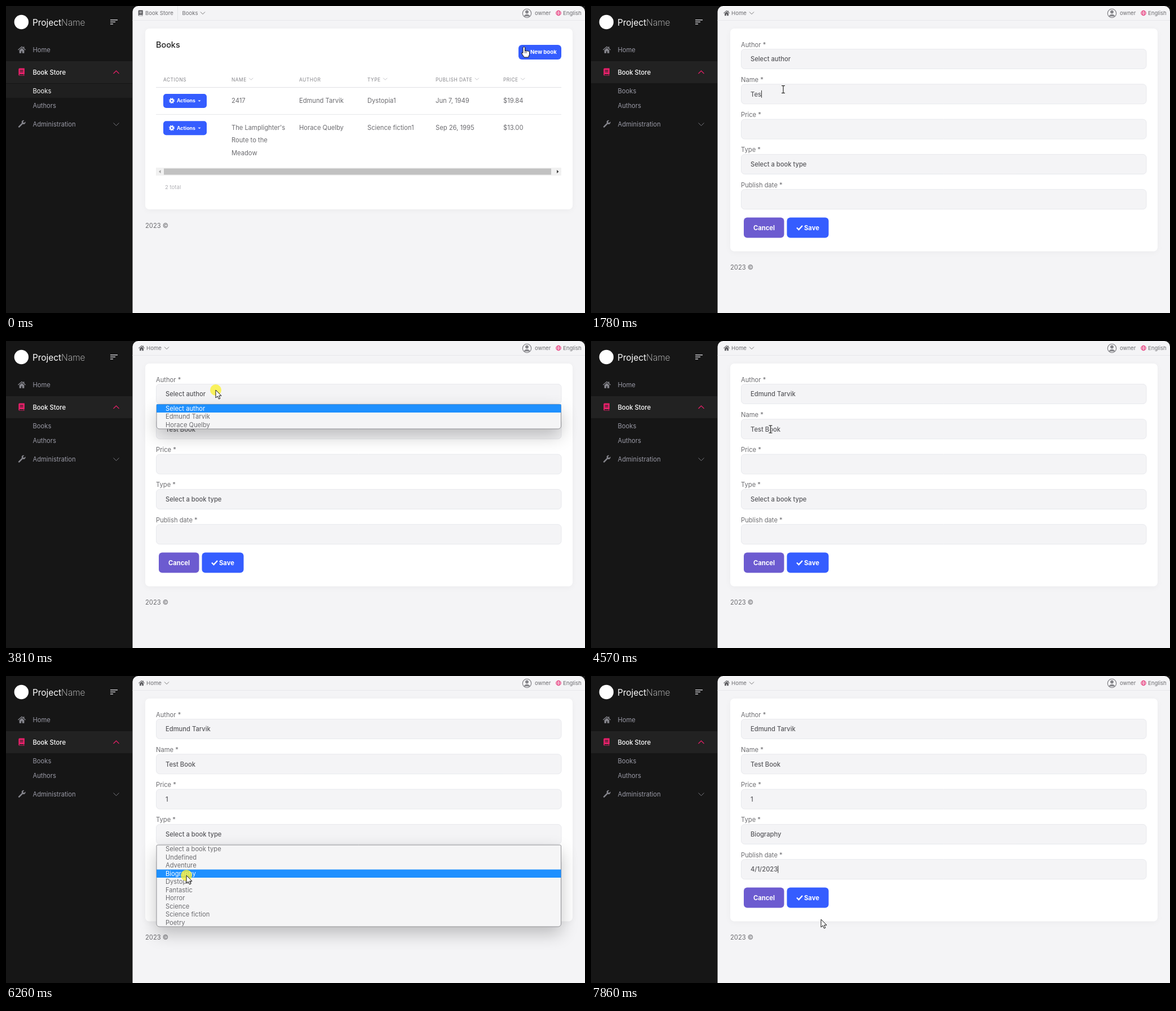
An HTML page with a canvas for the animation above (7990 ms loop, 1027x545 px).

```html
<!DOCTYPE html>
<html lang="en">
<head>
<meta charset="utf-8">
<title>New book form</title>
<style>
html, body { margin: 0; width: 100%; height: 100%; overflow: hidden; background: #161616; }
canvas { display: block; }
</style>
</head>
<body>
<canvas id="stage" width="1027" height="545"></canvas>
<script>
const ctx = document.getElementById('stage').getContext('2d');
const LOOP = 7990;
const BLUE = '#355dff', PINK = '#e8206a', FIELD = '#f4f4f6', GRAY = '#6c6c70';
const AUTHORS = ['Select author', 'Edmund Tarvik', 'Horace Quelby'];
const TYPES = ['Select a book type', 'Undefined', 'Adventure', 'Biography', 'Dystopia',
  'Fantastic', 'Horror', 'Science', 'Science fiction', 'Poetry'];
const ROW = 14.5, CELL = 25.6;

// Moments at which the state changes, in ms
const FORM = 330, AUTHOR_OPEN = 3770, AUTHOR_PICK = 4490, PRICE_FOCUS = 4890,
  TYPE_OPEN = 5450, TYPE_PICK = 6390, DATE_FOCUS = 6890, DATE_PICK = 7820;
const NAME_KEYS = [1320, 1570, 1780, 2030, 2280, 2530, 2730, 2900, 3080];
const CLICKS = [[80, 280], [3730, 3890], [4410, 4530], [4850, 4970],
  [5450, 5610], [6230, 6390], [6810, 6930]];
const POINTER = [[0, 919, 73], [400, 919, 73], [750, 543, 165], [830, 377, 170], [990, 62, 178],
  [1150, 341, 148], [1780, 341, 148], [2030, 343, 148], [2280, 343, 148], [2320, 353, 158],
  [3410, 353, 158], [3730, 372, 87], [3890, 372, 87], [4220, 326, 130], [4490, 326, 130],
  [4770, 300, 222], [5130, 300, 222], [5410, 322, 279], [5560, 322, 279], [6230, 320, 354],
  [6390, 320, 354], [6650, 322, 345], [6930, 322, 345], [7570, 408, 432], [LOOP, 408, 432]];

const HOME = new Path2D('M8 1 0 8l1 1 7-6 7 6 1-1-3-2.6V2h-2v1.6zM8 4.5 3 9v6h4v-4h2v4h4V9z');
const BOOK = new Path2D('M3 0h11v13h-1v2h1v1H3a2 2 0 0 1-2-2V2a2 2 0 0 1 2-2zM4 4v1.5h7V4zM4 7v1.5h7V7zM3 13v2h9v-2z');
const WRENCH = new Path2D('M1 13 8 6a4 4 0 0 1 5-5.5L10.5 3l.5 2 2 .5L15.5 3A4 4 0 0 1 10 8l-7 7a1.5 1.5 0 0 1-2-2z');
const ARROW = new Path2D('M0 0V14L3.2 11 5.5 16 7.8 15 5.6 10.2H10z');
const HAND = new Path2D('M-2 .5Q0-1.5 1.5.5V7q1.5-1 3 0 1.5-.8 2.8.3 2-.5 2.2 1.2V13L7.5 18H0L-4.5 11Q-5 9-2 10.5z');

function text(str, x, middle, size = 11.2, weight = 400, color = GRAY, spacing = 0, align = 'left') {
  ctx.font = `${weight} ${size}px Inter, sans-serif`;
  ctx.letterSpacing = spacing + 'px';
  ctx.textAlign = align;
  ctx.fillStyle = color;
  ctx.fillText(str, x, middle + size * 0.36);
  return ctx.measureText(str).width;
}

function rect(x, y, w, h, color) {
  ctx.fillStyle = color;
  ctx.fillRect(x, y, w, h);
}

function box(x, y, w, h, radius, fill, border) {
  ctx.beginPath();
  ctx.roundRect(x, y, w, h, radius);
  ctx.fillStyle = fill;
  ctx.fill();
  if (border) stroke(border, 1);
}

function stroke(color, width, path) {
  ctx.strokeStyle = color;
  ctx.lineWidth = width;
  path ? ctx.stroke(path) : ctx.stroke();
}

function line(points, color, width) {
  ctx.beginPath();
  points.forEach(([x, y]) => ctx.lineTo(x, y));
  stroke(color, width);
}

function disc(x, y, r, color) {
  ctx.beginPath();
  ctx.arc(x, y, r, 0, 7);
  ctx.fillStyle = color;
  ctx.fill();
}

function ring(x, y, rx, ry, color, width) {
  ctx.beginPath();
  ctx.ellipse(x, y, rx, ry, 0, 0, 2 * Math.PI);
  stroke(color, width);
}

function icon(path, x, y, size, color) {
  ctx.save();
  ctx.translate(x - size / 2, y - size / 2);
  ctx.scale(size / 16, size / 16);
  ctx.fillStyle = color;
  ctx.fill(path, 'evenodd');
  ctx.restore();
}

// Positive size points down, negative points up
function chevron(x, y, size, color, width = 1) {
  const w = Math.abs(size);
  line([[x - w, y - size / 2], [x, y + size / 2], [x + w, y - size / 2]], color, width);
}

function withShadow(color, blur, offset, draw) {
  ctx.save();
  Object.assign(ctx, { shadowColor: color, shadowBlur: blur, shadowOffsetY: offset });
  draw();
  ctx.restore();
}

function sidebar(onForm) {
  rect(0, 0, 1027, 545, '#161616');
  disc(27.3, 28.5, 12.7, '#fff');
  const w = text('Project', 47, 29, 15.4, 400, '#fff');
  text('Name', 47 + w, 29, 15.4, 200, '#ddd');
  [13, 9, 5].forEach((len, i) => rect(185, 24 + i * 3.6, len, 1.5, '#c4c4c8'));

  rect(0, 98, 224, 39, '#222');
  if (!onForm) rect(0, 138, 224, 25, '#1f1f1f');
  icon(HOME, 28, 77.5, 14, '#85858c');
  text('Home', 47.5, 78, 11.2, 400, '#9a9aa6');
  icon(BOOK, 28, 117, 13, PINK);
  text('Book Store', 47.5, 117.5, 11.2, 500, '#fff');
  chevron(195.5, 117.5, -5, PINK, 1.2);
  text('Books', 47.5, 150.5, 11.2, 400, onForm ? '#9a9aa6' : '#fff');
  text('Authors', 47.5, 177, 11.2, 400, '#9a9aa6');
  icon(WRENCH, 28, 209.5, 14, '#85858c');
  text('Administration', 47.5, 210, 11.2, 400, '#9a9aa6');
  chevron(195.5, 210, 5, '#77777e');
}

function topbar(onForm) {
  box(224.5, 0, 802.5, 560, [10, 10, 0, 0], FIELD);
  rect(224.5, 25, 802.5, 1, '#e7e8eb');
  if (onForm) {
    icon(HOME, 240.5, 12.5, 11, '#5c5c60');
    text('Home', 249, 13, 9.6);
    chevron(285, 12.5, 4, '#777');
  } else {
    icon(BOOK, 239, 12.5, 10, '#5c5c60');
    text('Book Store', 247, 13, 9.6);
    rect(304, 0, 1, 25, '#e4e5e8');
    text('Books', 312.5, 13, 9.6);
    chevron(349, 12.5, 4, '#777');
  }
  ring(924, 13, 7.7, 7.7, '#77777c', 1.1);
  disc(924, 10.5, 2.9, '#85858a');
  ctx.beginPath();
  ctx.ellipse(924, 18.6, 5.4, 3.8, 0, Math.PI, 0);
  ctx.fillStyle = '#85858a';
  ctx.fill();
  text('owner', 938, 13, 9.6);
  ring(980, 12.5, 4.3, 4.3, PINK, 0.9);
  ring(980, 12.5, 1.9, 4.3, PINK, 0.8);
  [11, 14].forEach(y => line([[976, y], [984, y]], PINK, 0.8));
  text('English', 988, 13, 9.6);
}

function card(height) {
  withShadow('rgba(0,0,0,.04)', 12, 2, () => box(247, 40, 758, height, 7, '#fff'));
  text('2023 ©', 247, 68.5 + height - 40 + 0.5 + 0 + (height > 350 ? 0 : 0) + 40 - 0.5);
}

function gear(x, y) {
  ring(x, y, 2.6, 2.6, '#fff', 2.2);
  ctx.setLineDash([1.7, 1.7]);
  ring(x, y, 4.3, 4.3, '#fff', 1.4);
  ctx.setLineDash([]);
}

function listPage() {
  card(321);
  text('Books', 266, 68.5, 14.4, 500, '#222');
  box(909, 69, 76, 26, 6, BLUE);
  text('New book', 930, 82, 9.6, 700, '#fff');

  const columns = [279, 400, 520, 641, 762, 882];
  ['ACTIONS', 'NAME', 'AUTHOR', 'TYPE', 'PUBLISH DATE', 'PRICE'].forEach((label, i) => {
    const w = text(label, columns[i], 130.5, 8.4, 400, '#85858a', 0.5);
    if (i % 2 || i === 4) chevron(columns[i] + w + 8, 129.5, 3.5, '#c4c4c8');
  });
  rect(266, 144, 719, 1, '#e0e1e4');
  rect(266, 192, 719, 1, '#e6e7ea');

  const rows = [
    [['2417'], AUTHORS[1], 'Dystopia1', 'Jun 7, 1949', '$19.84'],
    [["The Lamplighter's", 'Route to the', 'Meadow'], AUTHORS[2], 'Science fiction1', 'Sep 26, 1995', '$13.00']
  ];
  rows.forEach(([title, ...cells], r) => {
    const y = 167.5 + r * 48.3;
    box(279, y - 11.5, 77, 25, 5, BLUE);
    gear(294, y + 0.7);
    text('Actions', 303, y + 0.7, 8.8, 700, '#fff');
    triangle(343, y + 0.7, 2.5, 1.6, '#fff');
    title.forEach((part, i) => text(part, columns[1], y + i * 22.4));
    cells.forEach((cell, i) => text(cell, columns[i + 2], y));
  });

  rect(266, 287, 719, 14, '#f1f1f1');
  rect(280, 288.5, 687, 11, '#c1c1c1');
  sideTriangle(271, 294, 3.5, '#a3a3a3');
  sideTriangle(980.5, 294, -3.5, '#404040');
  text('2 total', 282, 321.5, 9.6, 400, '#b0b0b5');
}

function triangle(x, y, w, h, color) {
  ctx.beginPath();
  ctx.moveTo(x - w, y - h / 2);
  ctx.lineTo(x + w, y - h / 2);
  ctx.lineTo(x, y + h);
  ctx.fillStyle = color;
  ctx.fill();
}

function sideTriangle(x, y, w, color) {
  ctx.beginPath();
  ctx.moveTo(x, y);
  ctx.lineTo(x + w, y - 3);
  ctx.lineTo(x + w, y + 3);
  ctx.fillStyle = color;
  ctx.fill();
}

function formPage(t, y) {
  card(395.5);
  const typed = NAME_KEYS.filter(key => key <= t).length;
  const fields = [
    ['Author *', AUTHORS[t < AUTHOR_PICK ? 0 : 1]],
    ['Name *', 'Test Book'.slice(0, typed), t < 3690],
    ['Price *', t < 5170 ? '' : '1', t >= PRICE_FOCUS && t < TYPE_OPEN],
    ['Type *', TYPES[t < TYPE_PICK ? 0 : 3]],
    ['Publish date *', t < DATE_PICK ? '' : '4/1/2023', t >= DATE_FOCUS]
  ];
  fields.forEach(([label, value, focused], i) => {
    const top = 76.5 + i * 62.3;
    text(label, 266, top - 8);
    box(266.5, top, 718.5, 35, 6, FIELD, '#e8e9ed');
    const w = text(value, 283, top + 17.7, 11.2, 500, '#58585c');
    if (focused) rect(283 + w, top + 11, 1, 13, '#333');
  });

  box(271, 375.5, 71.5, 36, 6, '#6c5bd0');
  text('Cancel', 288, 394, 11.2, 700, '#fff');
  box(347.5, 375.5, 74, 36, 6, BLUE);
  line([[365, 393.5], [368.5, 397], [375, 390]], '#fff', 2.3);
  text('Save', 378, 394, 11.2, 700, '#fff');

  if (t >= AUTHOR_OPEN && t < AUTHOR_PICK) dropdown(AUTHORS, 112.5, y);
  if (t >= TYPE_OPEN && t < TYPE_PICK) dropdown(TYPES, 300, y);
  if (t >= DATE_FOCUS + 40 && t < DATE_PICK) calendar(t);
}

function dropdown(options, top, pointerY) {
  const height = options.length * ROW;
  const active = Math.max(0, Math.floor((pointerY - top) / ROW));
  withShadow('rgba(0,0,0,.24)', 30, 12, () => box(267, top, 717.5, height, [2, 2, 5, 5], FIELD));
  box(267, top, 717.5, height, [2, 2, 5, 5], '#f5f5f6', '#909094');
  rect(267, top + active * ROW, 717.5, ROW, '#1e90ff');
  options.forEach((option, i) =>
    text(option, 283, top + (i + 0.5) * ROW + 0.2, 11.2, 400, i === active ? '#fff' : GRAY));
}

function calendar(t) {
  box(258.5, 362.5, 195, 200, 5, '#fff', '#e4e5e8');
  const column = j => 266.4 + CELL * (j + 0.5);
  line([[277, 375], [273, 379], [277, 383]], BLUE, 1.5);
  line([[435, 375], [439, 379], [435, 383]], BLUE, 1.5);
  [['Apr', 291], ['2023', 358]].forEach(([label, x]) => {
    box(x + 0.5, 368.5, 62, 21, 4, FIELD, '#e4e5e8');
    text(label, x + 9, 379, 10);
    chevron(x + 53, 379, 3, '#777');
  });
  ['Mo', 'Tu', 'We', 'Th', 'Fr', 'Sa', 'Su'].forEach((day, j) =>
    text(day, column(j), 406, 9.6, 400, '#8a8a90', 0, 'center'));
  for (let k = 0; k < 35; k++) {
    const x = column(k % 7), y = 432 + Math.floor(k / 7) * CELL;
    if (k === 5 && t >= 7530) box(x - 12, y - 12, 24, 24, 4, '#e9ecef');
    text(k < 5 ? 27 + k : k - 4, x, y, 11.2, 400, k < 5 ? '#bbb' : '#555', 0, 'center');
  }
}

function pointerAt(t) {
  const i = POINTER.findIndex(key => key[0] > t);
  const [t0, x0, y0] = POINTER[i - 1], [t1, x1, y1] = POINTER[i];
  const u = (t - t0) / (t1 - t0);
  return [x0 + (x1 - x0) * u, y0 + (y1 - y0) * u];
}

function pointer(t, x, y) {
  if (CLICKS.some(([from, to]) => t >= from && t < to)) disc(x, y, 10, 'rgba(250,240,50,.78)');
  const listOpen = (t >= AUTHOR_OPEN && t < AUTHOR_PICK) || (t >= TYPE_OPEN && t < TYPE_PICK);
  const overInput = x > 266 && !listOpen &&
    [138, 201, 325].some(top => y > top && y < top + 36);
  const hand = t < FORM || (t >= 7610 && t < 7860);
  ctx.save();
  ctx.translate(x, y);
  if (!hand && overInput) {
    for (const [color, width] of [['#fff', 2.6], ['#222', 1.2]]) {
      line([[-3, -6.5], [3, -6.5]], color, width);
      line([[0, -6.5], [0, 6.5]], color, width);
      line([[-3, 6.5], [3, 6.5]], color, width);
    }
  } else {
    const shape = hand ? HAND : ARROW;
    ctx.fillStyle = '#fff';
    ctx.fill(shape);
    stroke('#111', 1, shape);
    if (hand) [3, 5.5].forEach(dx => line([[dx - 1.5, 7.5], [dx - 1.5, 11]], '#111', 0.7));
  }
  ctx.restore();
}

function frame(now) {
  const t = now % LOOP;
  const onForm = t >= FORM;
  const [x, y] = pointerAt(t);
  sidebar(onForm);
  topbar(onForm);
  onForm ? formPage(t, y) : listPage();
  pointer(t, x, y);
  requestAnimationFrame(frame);
}
requestAnimationFrame(frame);
</script>
</body>
</html>
```
